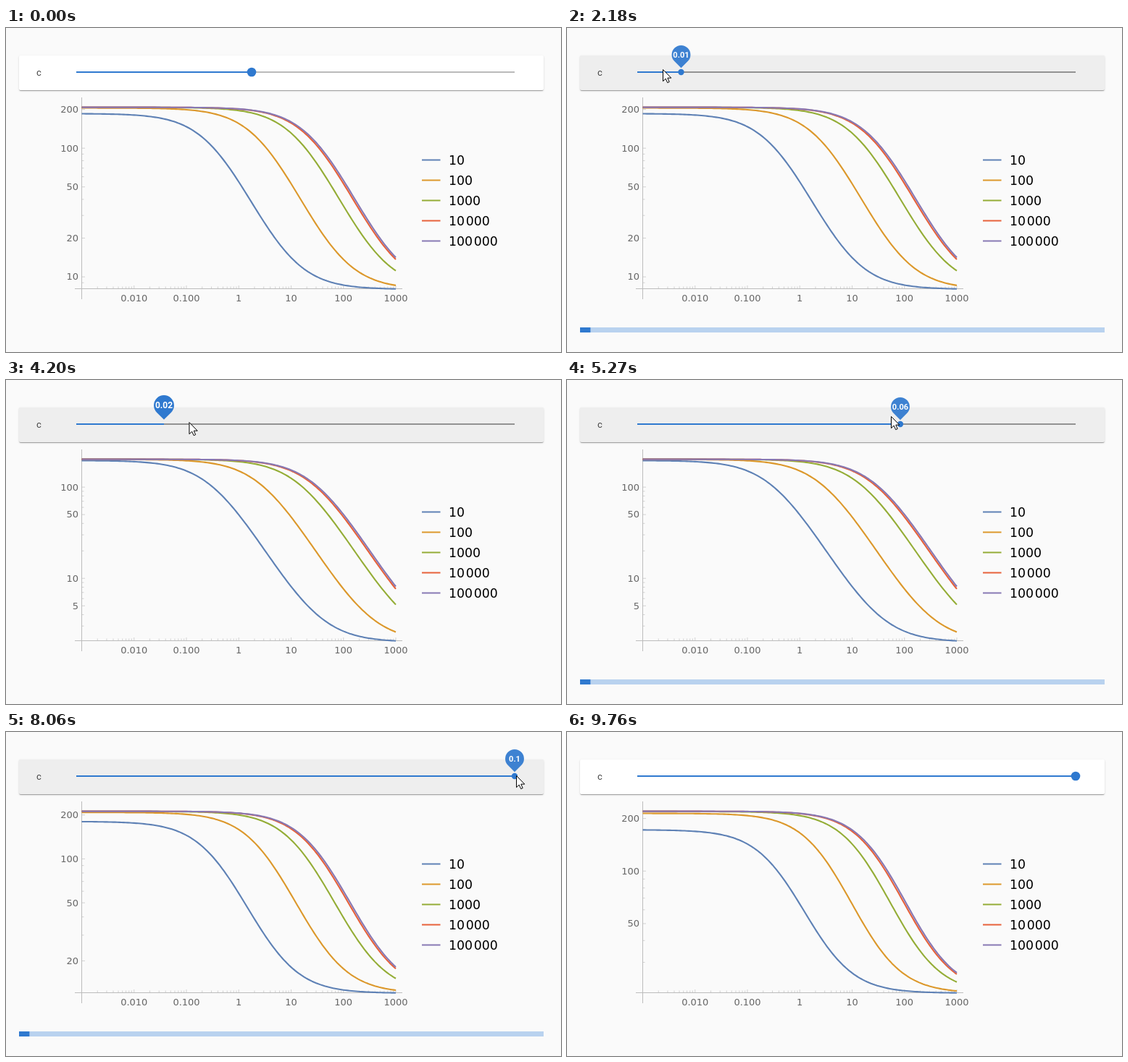
An HTML page for the animation above (9990 ms loop, 766 by 448 pixels).

```html
<!DOCTYPE html>
<html lang="en">
<head>
<meta charset="utf-8">
<title>Slider plot</title>
<style>
html, body { margin: 0; width: 100%; height: 100%; overflow: hidden; background: #fafafa; }
#card {
  position: absolute; left: 18px; top: 38px; width: 724px; height: 48px; border-radius: 2px;
  box-shadow: 0 2px 1px -1px rgba(0,0,0,.2), 0 1px 1px rgba(0,0,0,.14), 0 1px 3px rgba(0,0,0,.12);
}
svg { position: absolute; left: 0; top: 0; display: block; }
.num { font: 13px "DejaVu Sans", sans-serif; fill: #666; }
.key { font: 17.3px "DejaVu Sans", sans-serif; fill: #000; }
.ui { font: 13px Roboto, sans-serif; fill: #444; }
.pin { font: 700 12px Roboto, sans-serif; fill: #fff; }
</style>
</head>
<body>
<div id="card"></div>
<svg id="stage" width="766" height="448" viewBox="0 0 766 448"></svg>
<script>
const LOOP = 9990, BLUE = '#2f79cf', AXIS = '#bcbcbc', TICK = '#d2d2d2';
const TRACK = { x: 97, y: 61, w: 605 };
const COLORS = ['#5e81b5', '#dc982b', '#94ad36', '#e6613a', '#8778b3'];

// The pointer rests between these straight moves
const ENTRY = { x: 520, y: 301 };
const MOVES = [
  { from: 70, to: 470, x: 341, y: 57 },
  { from: 800, to: 1710, x: 148, y: 62 },
  { from: 1780, to: 1860, x: 132, y: 57 },
  { from: 2400, to: 3000, x: 163, y: 61 },
  { from: 3570, to: 3720, x: 159, y: 62 },
  { from: 3870, to: 4890, x: 447, y: 50 },
  { from: 6840, to: 6910, x: 455, y: 54 },
  { from: 7140, to: 7830, x: 704, y: 60 },
  { from: 9080, to: 9760, x: 764, y: 450 }
];
// Each release starts loading; the plot changes when it is ready
const DRAGS = [
  { press: 770, release: 2180, ready: 3420 },
  { press: 3890, release: 5270, ready: 5960 },
  { press: 7140, release: 8060, ready: 8750 }
];

const stage = document.getElementById('stage'), card = document.getElementById('card');
const clamp = (v, a = 0, b = 1) => Math.min(b, Math.max(a, v));
const smooth = u => u * u * (3 - 2 * u);
const ramp = (t, a, b) => clamp((t - a) / (b - a));

function set(el, attrs) {
  for (const k in attrs) el.setAttribute(k, attrs[k]);
}
function add(tag, attrs, parent = stage, text) {
  const el = document.createElementNS('http://www.w3.org/2000/svg', tag);
  set(el, attrs);
  if (text !== undefined) el.textContent = text;
  parent.append(el);
  return el;
}

// Plot
const RATE = 31.25;
const xPos = lg => 104.5 + (lg + 3) * 72.25;
const model = (x, n, c) => 200 * (c + 1 / (1 + RATE * (x / 1000 + (x + c) / n)));

function buildFrame() {
  let major = '', minor = '';
  for (let e = -3; e < 3; e++) {
    major += `M${xPos(e + 1)} 360v-4`;
    for (let m = 2; m < 10; m++) minor += `M${xPos(e + Math.log10(m))} 360v-2.5`;
    add('text', { x: xPos(e + 1), y: 378, class: 'num', 'text-anchor': 'middle' }, stage,
      e < -1 ? (10 ** (e + 1)).toFixed(3) : 10 ** (e + 1));
  }
  add('path', { d: major + minor, stroke: TICK });
  add('path', { d: 'M104.5 96V375M95 360.5H547', stroke: AXIS, fill: 'none' });
  COLORS.forEach((stroke, i) => {
    const y = 182.5 + 28 * i, label = String(10 ** (i + 1)).replace(/^(\d{2,})(000)$/, '$1\u200a$2');
    add('path', { d: `M574 ${y}h25.5`, stroke, 'stroke-width': 2 });
    add('text', { x: 611, y: y + 6.5, class: 'key' }, stage, label);
  });
}

buildFrame();
const yAxis = add('g', {});
const curves = COLORS.map(stroke => add('path', { fill: 'none', stroke, 'stroke-width': 2.1, 'stroke-linejoin': 'round' }));
let shown;

function drawPlot(step) {
  if (step === shown) return;
  shown = step;
  const c = step / 100, top = 200 * (1 + c), low = model(1000, 10, c);
  const span = Math.log10(top / low);
  const yPos = v => 109.6 + 251.1 / span * Math.log10(top / v);
  const labelled = span > 1.7 ? [1, 5] : [1, 2, 5];
  yAxis.replaceChildren();
  for (let dec = 1; dec < 1000; dec *= 10)
    for (let m = 1; m < 10; m++) {
      const v = m * dec, y = yPos(v), big = labelled.includes(m);
      if (v < low || v > 0.995 * top) continue;
      if (big && v === 200 && span > 1.7) continue;
      add('path', { d: `M105 ${y}h${big ? 4 : 2.5}`, stroke: TICK }, yAxis);
      if (big) add('text', { x: 100, y: y + 4.4, class: 'num', 'text-anchor': 'end' }, yAxis, v);
    }
  curves.forEach((curve, i) => {
    let d = '';
    for (let lg = -3; lg < 3.01; lg += 0.04)
      d += `${d ? 'L' : 'M'}${xPos(lg).toFixed(2)} ${yPos(model(10 ** lg, 10 ** (i + 1), c)).toFixed(2)}`;
    set(curve, { d });
  });
}

// Slider, loading bar and pointer
add('text', { x: 42, y: 66, class: 'ui' }, stage, 'c');
const rail = add('rect', { x: TRACK.x, y: TRACK.y - 1, width: TRACK.w, height: 2 });
const fill = add('rect', { x: TRACK.x, y: TRACK.y - 1, height: 2, fill: BLUE });
const knob = add('circle', { cy: TRACK.y, fill: BLUE });
const pin = add('g', {});
add('path', { d: 'M0 19.8L-9.9 9.9A14 14 0 1 1 9.9 9.9Z', fill: BLUE }, pin);
const pinText = add('text', { y: 4.3, class: 'pin', 'text-anchor': 'middle' }, pin);
const bar = add('g', {});
add('rect', { x: 18, y: 414, width: 724, height: 7, fill: '#b9d2ef' }, bar);
const runner = add('rect', { y: 414, height: 7, fill: BLUE }, bar);
const pointer = add('path', {
  d: 'M.5 .5V16.6L4.2 13.1L6.7 18.6L9.2 17.5L6.8 12.1H11.8Z',
  fill: '#fff', stroke: '#000', 'stroke-linejoin': 'round'
});

function pointerAt(t) {
  let { x, y } = ENTRY;
  for (const m of MOVES) {
    const u = ramp(t, m.from, m.to);
    x += (m.x - x) * u;
    y += (m.y - y) * u;
  }
  return { x, y };
}

// Slider step, following the pointer with a short lag
const stepAt = t => clamp(Math.round((pointerAt(t - 60).x - TRACK.x) / TRACK.w * 10), 0, 10);

function drawSlider(t, drag) {
  let step = 4, open = 0, size = 1;
  if (drag) {
    step = stepAt(Math.min(t, drag.release));
    if (t < drag.release) {
      open = 1 - (1 - ramp(t + 40, drag.press, drag.press + 400)) ** 3;
      size = 1 - open;
    } else {
      const p = ramp(t + 66, drag.release, drag.release + 400);
      open = 1 - smooth(p);
      size = 1 - (1 - p) ** 6;
    }
  }
  const x = TRACK.x + TRACK.w * step / 10;
  set(fill, { width: x - TRACK.x });
  set(knob, { cx: x, r: 6.3 * size });
  set(pin, { transform: `translate(${x} ${TRACK.y - 26 * open}) scale(${open})`, opacity: open });
  pinText.textContent = step / 100;
}

function drawBar(t, drag) {
  const busy = drag && t >= drag.release && t < drag.ready;
  set(bar, { visibility: busy ? 'visible' : 'hidden' });
  if (!busy) return;
  const p = 1 - (1 - ramp(t + 6, drag.release, drag.release + 1070)) ** 1.6;
  const tail = clamp(-.35 + 1.35 * p), head = clamp(1.9 * p);
  set(runner, { x: 18 + 724 * tail, width: 724 * (head - tail) });
}

function render(t) {
  const drag = DRAGS.filter(d => t >= d.press).pop();
  const done = DRAGS.filter(d => t >= d.ready).pop();
  drawPlot(done ? stepAt(done.release) : 4);
  drawSlider(t, drag);
  drawBar(t, drag);
  const leave = ramp(t, 9200, 9500);
  const shade = 255 - 17 * (ramp(t, 350, 650) - leave);
  card.style.background = `rgb(${shade},${shade},${shade})`;
  set(rail, { 'fill-opacity': .27 + .12 * (ramp(t, 770, 1170) - leave) });
  const { x, y } = pointerAt(t);
  set(pointer, { transform: `translate(${x} ${y})`, visibility: t >= 70 && t < 9760 ? 'visible' : 'hidden' });
}

const start = performance.now();
function tick() {
  render((performance.now() - start) % LOOP);
  requestAnimationFrame(tick);
}
tick();
</script>
</body>
</html>
```
